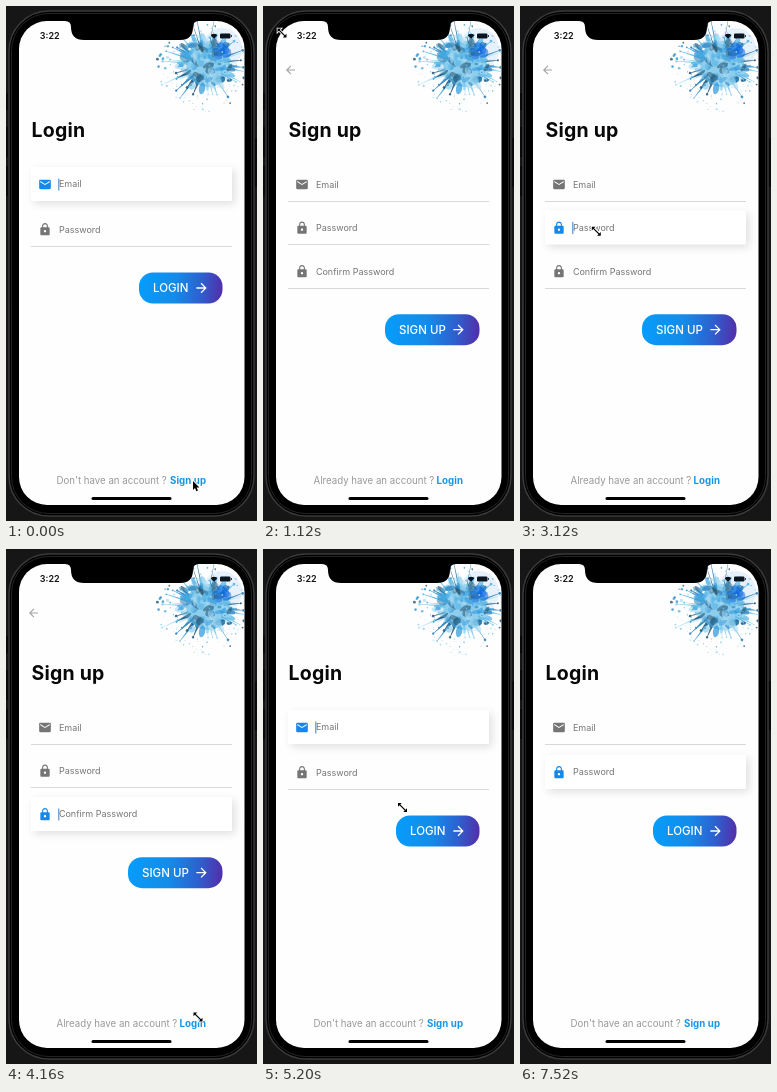
Animation, 251 px wide and 515 px high, one loop 7600 ms. Source, as an HTML page with a canvas:

```html
<!DOCTYPE html>
<html lang="en">
<head>
<meta charset="utf-8">
<title>Login and sign up</title>
<style>
html, body { margin: 0; width: 100%; height: 100%; overflow: hidden; background: #161616; }
canvas { display: block; width: 251px; height: 515px; }
</style>
</head>
<body>
<canvas id="stage"></canvas>
<script>
const LOOP = 7600, STEP = 80, SLIDE = 400;
const canvas = document.getElementById('stage');
const c = canvas.getContext('2d');
const dpr = window.devicePixelRatio || 1;
canvas.width = 251 * dpr;
canvas.height = 515 * dpr;

const BLUE = '#1389ee', GREY = '#757575';
const icons = {
  mail: 'M20 4H4c-1.1 0-2 .9-2 2v12c0 1.1.9 2 2 2h16c1.1 0 2-.9 2-2V6c0-1.1-.9-2-2-2zm0 4l-8 5-8-5V6l8 5 8-5v2z',
  lock: 'M18 8h-1V6c0-2.76-2.24-5-5-5S7 3.24 7 6v2H6c-1.1 0-2 .9-2 2v10c0 1.1.9 2 2 2h12c1.1 0 2-.9 2-2V10c0-1.1-.9-2-2-2zm-6 9c-1.1 0-2-.9-2-2s.9-2 2-2 2 .9 2 2-.9 2-2 2zm3.1-9H8.9V6c0-1.71 1.39-3.1 3.1-3.1 1.71 0 3.1 1.39 3.1 3.1v2z',
  back: 'M20 11H7.83l5.59-5.59L12 4l-8 8 8 8 1.41-1.41L7.83 13H20v-2z',
  next: 'M12 4l-1.41 1.41L16.17 11H4v2h12.17l-5.58 5.59L12 20l8-8z'
};
for (const name in icons) icons[name] = new Path2D(icons[name]);

const arrow = new Path2D('M0 0v9l2-1.9 1.4 3.1 1.6-.7-1.4-3h2.8z');
const resize = new Path2D('M-4.5-4.5H-.8L-2.2-3.1 3.1 2.2 4.5.8V4.5H.8L2.2 3.1-3.1-2.2-4.5-.8z');

const pages = {
  login: {
    title: 'Login', button: 'LOGIN', left: 133, top: 266.5,
    ask: "Don't have an account ?", link: 'Sign up', pitch: 45,
    fields: ['Email', 'Password']
  },
  signup: {
    title: 'Sign up', button: 'SIGN UP', left: 122, top: 308.2,
    ask: 'Already have an account ?', link: 'Login', pitch: 43.5, back: true,
    fields: ['Email', 'Password', 'Confirm Password']
  }
};

// [start, field index], -1 for no focus
const focus = {
  login: [[0, 0], [4800, 0], [5760, 1]],
  signup: [[0, -1], [2240, 0], [2960, 1], [3680, 2]]
};

// [time, x, y]
const pointerPath = [
  [0, 187, 475], [480, 187, 475], [800, 120, 260], [1120, 19, 27], [1280, 18, 17],
  [1440, 60, 40], [1760, 237, 110], [2160, 74, 178], [2400, 74, 178],
  [2800, 76, 222], [3040, 76, 222], [3520, 80, 266], [3760, 80, 266],
  [4160, 192, 468], [4320, 187, 474], [4560, 187, 474], [5200, 139.5, 258.5],
  [5600, 100, 224], [5840, 100, 224], [6160, 190, 421], [6560, 188, 440],
  [7120, 150, 11], [7200, 148, -15], [LOOP, 148, -15]
];

function randomiser(seed) {
  return () => (seed = seed * 16807 % 2147483647) / 2147483647;
}

function rounded(x, y, w, h, r, fill) {
  c.beginPath();
  c.roundRect(x, y, w, h, r);
  c.fillStyle = fill;
  c.fill();
}

function text(value, x, y, size, color, weight = 400, spacing = 0) {
  c.font = `${weight} ${size}px Inter, "Liberation Sans", sans-serif`;
  c.letterSpacing = spacing + 'px';
  c.fillStyle = color;
  c.fillText(value, x, y);
}

function icon(name, x, y, size, color) {
  c.save();
  c.translate(x - size / 2, y - size / 2);
  c.scale(size / 24, size / 24);
  c.fillStyle = color;
  c.fill(icons[name]);
  c.restore();
}

function splash() {
  const rnd = randomiser(90210);
  const shades = ['#b5e0f4', '#86cdee', '#4fb2e6', '#2c97dc', '#2a7db5', '#245674'];
  const shade = () => shades[Math.floor(rnd() * shades.length)];
  const blot = (x, y, rx, ry = rx, turn = 0) => {
    c.beginPath();
    c.ellipse(x, y, rx, ry, turn, 0, 7);
    c.fill();
  };
  const scatter = (count, near, far, paint) => {
    for (let i = 0; i < count; i++) {
      const a = rnd() * 6.283, d = near + Math.sqrt(rnd()) * (far - near);
      c.fillStyle = shade();
      paint(Math.cos(a) * d, Math.sin(a) * d, a);
    }
  };
  c.save();
  c.translate(200, 58);
  // Soft wash on the upper right
  c.globalAlpha = 0.35;
  c.fillStyle = '#b9d8f6';
  blot(16, -15, 20, 21);
  // Thin spikes with a drop at the tip
  c.globalAlpha = 0.85;
  for (let i = 0; i < 40; i++) {
    const len = 30 + rnd() ** 2 * 19, w = 0.6 + rnd() * 1.7;
    c.save();
    c.rotate(rnd() * 6.283);
    c.fillStyle = shade();
    c.beginPath();
    c.moveTo(18, -w);
    c.quadraticCurveTo(25, -w * 0.4, len, -0.2);
    c.lineTo(len, 0.2);
    c.quadraticCurveTo(25, w * 0.4, 18, w);
    c.fill();
    blot(len, 0, 0.4 + rnd());
    c.restore();
  }
  // Ragged core built from overlapping patches
  c.globalAlpha = 0.7;
  c.fillStyle = '#62b9e6';
  blot(2, 0, 22, 23);
  scatter(34, 14, 28, (x, y, a) => blot(x, y, 2 + rnd() * 5, 1 + rnd() * 2.5, a));
  c.globalAlpha = 0.55;
  scatter(75, 0, 24, (x, y) => blot(x, y, 1 + rnd() * 5, 1 + rnd() * 3, rnd() * 3));
  c.fillStyle = '#0f6be0';
  for (let i = 0; i < 7; i++) blot(8 + rnd() * 13, -18 + rnd() * 10, 2 + rnd() * 3);
  // Fine drops
  c.globalAlpha = 0.8;
  scatter(150, 8, 49, (x, y) => blot(x, y, 0.3 + rnd() * rnd() * 1.4));
  c.restore();
}

function field(label, y, active, caret) {
  if (active) {
    c.save();
    c.shadowColor = 'rgba(0,0,0,.12)';
    c.shadowBlur = 8 * dpr;
    c.shadowOffsetX = c.shadowOffsetY = 3 * dpr;
    rounded(25, y - 17, 201, 34, 1, '#fff');
    c.restore();
  } else {
    c.fillStyle = '#d8d8d8';
    c.fillRect(25, Math.floor(y + 17), 201, 1);
  }
  icon(label === 'Email' ? 'mail' : 'lock', 39, y + 0.5, 14, active ? BLUE : GREY);
  text(label, 52.9, y + (active ? 3.3 : 3.9), 9, GREY);
  if (caret) {
    c.fillStyle = '#3b7fc4';
    c.fillRect(52.3, y - 5.5, 1, 12);
  }
}

function drawPage(name, offset, t) {
  const page = pages[name];
  const [since, active] = focus[name].findLast(entry => entry[0] <= t);
  c.save();
  c.translate(offset, 0);
  c.save();
  if (offset > 0) {
    c.shadowColor = 'rgba(0,0,0,.2)';
    c.shadowBlur = 10 * dpr;
  }
  c.fillStyle = '#fefefe';
  c.fillRect(13, 15, 226, 485);
  c.restore();
  c.beginPath();
  c.rect(13, 15, 226, 485);
  c.clip();
  splash();
  if (page.back) icon('back', 27.5, 64, 13.5, '#a4a4a4');
  text(page.title, 25.5, 131, 19.5, '#080808', 700, 0.2);
  page.fields.forEach((label, i) => {
    const chosen = i === active;
    field(label, 178 + i * page.pitch, chosen, chosen && (t - since) % 1000 < 500);
  });

  const { left, top } = page;
  const paint = c.createLinearGradient(left, top, 216.5, top + 8);
  paint.addColorStop(0, '#069dfb');
  paint.addColorStop(0.45, '#148be9');
  paint.addColorStop(0.75, '#2d61cf');
  paint.addColorStop(1, '#5130ab');
  rounded(left, top, 216.5 - left, 31, 14, paint);
  text(page.button, left + 14, top + 19.6, 11.5, '#fff', 500);
  icon('next', 195.5, top + 15.5, 15.5, '#fff');

  text(page.ask, 50.5, 478, 9.68, '#999');
  c.textAlign = 'right';
  text(page.link, 200.2, 478, 9.7, '#1596e6', 700, 0.1);
  c.textAlign = 'left';
  c.restore();
}

function phoneBody() {
  c.fillStyle = '#161616';
  c.fillRect(0, 0, 251, 515);
  c.fillStyle = '#090909';
  for (const [x, y, h] of [[0, 87, 17], [0, 121, 30], [0, 160, 30], [248, 132, 49]]) {
    c.fillRect(x, y, 3, h);
  }
  rounded(3, 5, 245, 505, 40, '#000');
  c.strokeStyle = '#3a3a3a';
  c.lineWidth = 1.5;
  c.stroke();
  c.beginPath();
  c.roundRect(5.5, 7.5, 240, 500, 37);
  c.strokeStyle = '#242424';
  c.lineWidth = 1;
  c.stroke();
}

function statusBar() {
  c.fillStyle = '#000';
  c.fill(new Path2D('M59 14V15Q65 15 65 21Q65 34 78 34H174Q187 34 187 21Q187 15 193 15V14Z'));
  text('3:22', 33.8, 33.3, 9, '#111', 600);
  rounded(214, 27.5, 10.5, 5, 1.3, '#0b1520');
  c.fillRect(225, 29, 0.8, 2);
  c.beginPath();
  c.moveTo(208, 33);
  c.arc(208, 33, 5, -2.3, -0.84);
  c.fill();
  rounded(85.5, 491, 80, 3, 1.5, '#000');
}

function drawPointer(t) {
  const i = pointerPath.findIndex(point => point[0] > t);
  const [t0, x0, y0] = pointerPath[i - 1], [t1, x1, y1] = pointerPath[i];
  const p = (t - t0) / (t1 - t0), k = p * p * (3 - 2 * p);
  const shape = t < 1040 ? arrow : resize;
  c.save();
  c.translate(x0 + (x1 - x0) * k, y0 + (y1 - y0) * k);
  c.strokeStyle = '#fff';
  c.lineWidth = 1.6;
  c.stroke(shape);
  c.fillStyle = '#000';
  c.fill(shape);
  c.restore();
}

// 0 shows login, 1 shows sign up
function pageProgress(t) {
  const ease = start => 1 - (1 - Math.min(1, Math.max(0, (t - start) / SLIDE))) ** 3;
  return ease(160) - ease(4400);
}

function draw(t) {
  c.setTransform(dpr, 0, 0, dpr, 0, 0);
  phoneBody();
  c.save();
  c.beginPath();
  c.roundRect(13, 15, 225.5, 484, 28);
  c.clip();
  const p = pageProgress(t);
  if (p < 1) drawPage('login', -75 * p, t);
  if (p > 0) drawPage('signup', 225 * (1 - p), t);
  statusBar();
  c.restore();
  drawPointer(t);
}

const began = performance.now();
function frame() {
  const t = (performance.now() - began) % LOOP;
  draw(Math.floor(t / STEP) * STEP);
  requestAnimationFrame(frame);
}
frame();
</script>
</body>
</html>
```
